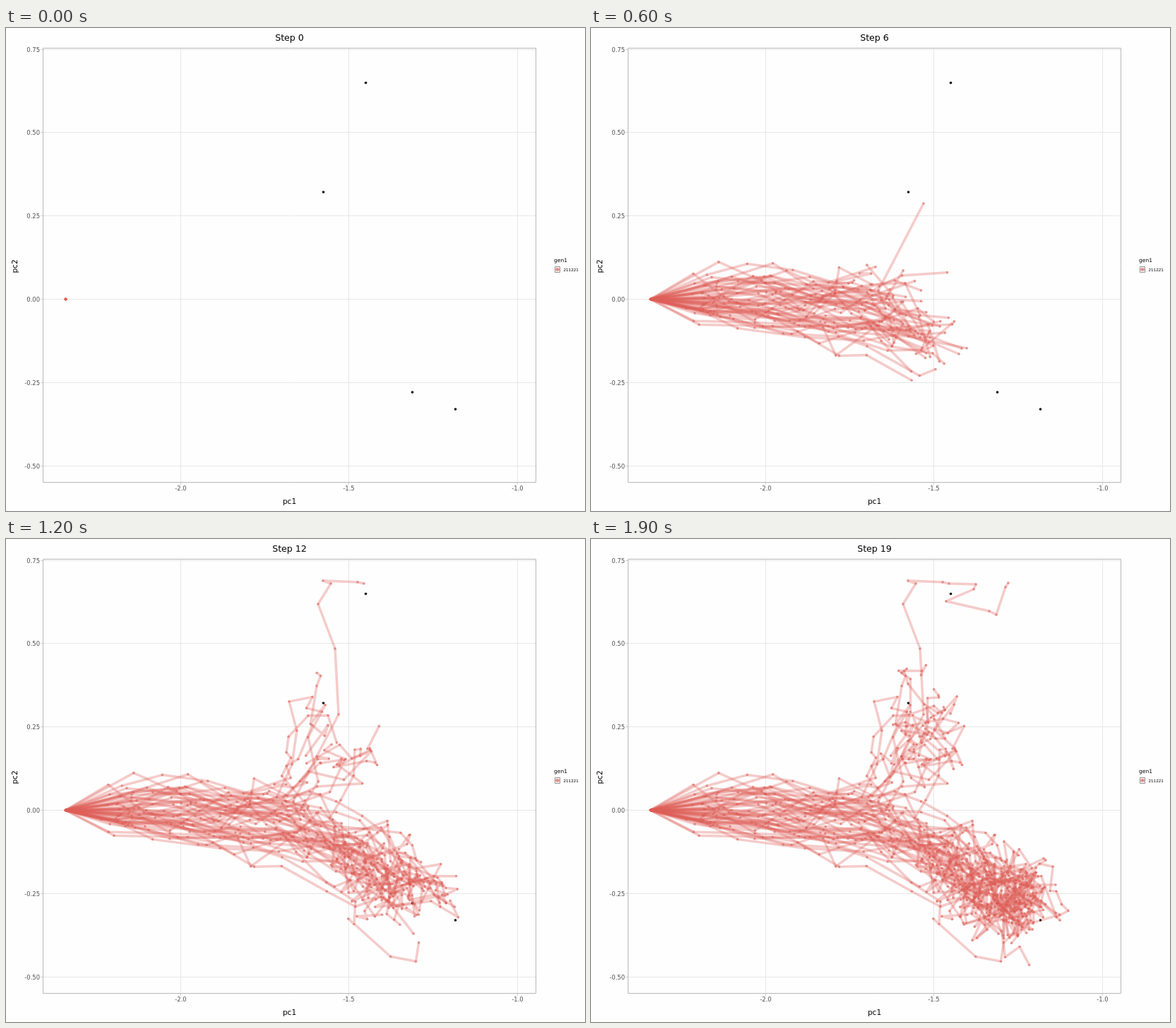
Recreate the animation shown at these times as an HTML page with a canvas. Size 820 by 683 pixels, loop 2000 ms.

```html
<!DOCTYPE html>
<html lang="en">
<head>
<meta charset="utf-8">
<title>Trait walks</title>
<style>
  html, body { margin: 0; width: 100%; height: 100%; overflow: hidden; background: #fefefe; }
  canvas { display: block; }
</style>
</head>
<body>
<canvas id="stage" width="820" height="683"></canvas>
<script>
const ctx = document.getElementById('stage').getContext('2d');
const STEP_MS = 100, STEPS = 20, WALKERS = 50, UPPER = 11, STRIDE = 86;
const RED = '219,95,87';
const START = [84.5, 383.5];
const OPTIMA = [[509.5, 77.5], [449.5, 232], [575.5, 515], [636.5, 539]];
// The one walker that climbs to the top optimum: its last positions
const CLIMB = [[471, 248], [466, 155], [442, 92], [460, 63], [449, 59], [498, 61], [507, 63],
  [545, 64], [542, 71], [503, 88], [564, 102], [574, 107], [587, 68], [591, 62]];
const toX = v => 247.5 + (v + 2) * 476.6;
const toY = v => 383.5 - v * 471.2;

function seededRandom(seed) {
  return () => {
    seed = (seed + 0x6D2B79F5) | 0;
    let t = Math.imul(seed ^ (seed >>> 15), 1 | seed);
    t = (t + Math.imul(t ^ (t >>> 7), 61 | t)) ^ t;
    return ((t ^ (t >>> 14)) >>> 0) / 4294967296;
  };
}
const random = seededRandom(211221);
const spread = () => random() * 2 - 1;
const bell = () => spread() + spread() + spread();

// Walkers run level at a steady stride, then slow down and bend towards their goal.
function makeWalk(index) {
  const upper = index < UPPER, lean = spread();
  const [goalX, goalY] = upper ? [468 + 22 * lean, 268 + 20 * lean] : [594 + 46 * lean, 521 + 24 * lean];
  const bend = upper ? 8 : 4;
  const walk = [START];
  let dx = 0, dy = 38 * spread();
  for (let step = 1; step < STEPS; step++) {
    const progress = Math.tanh(step * STRIDE / (goalX - START[0]));
    dx = dx * 0.72 + bell() * 19;
    dy = dy * 0.8 + bell() * 19;
    walk.push([
      START[0] + (goalX - START[0]) * progress + dx,
      START[1] + (goalY - START[1]) * progress ** bend + dy
    ]);
  }
  return walk;
}
const walks = Array.from({ length: WALKERS }, (_, i) => makeWalk(i));
walks[0].splice(STEPS - CLIMB.length, CLIMB.length, ...CLIMB);

function line(x0, y0, x1, y1, color, width = 1) {
  ctx.strokeStyle = color;
  ctx.lineWidth = width;
  ctx.beginPath();
  ctx.moveTo(x0, y0);
  ctx.lineTo(x1, y1);
  ctx.stroke();
}

function dot(x, y, r, color) {
  ctx.fillStyle = color;
  ctx.beginPath();
  ctx.arc(x, y, r, 0, 2 * Math.PI);
  ctx.fill();
}

function label(text, x, y, size, align = 'center', color = '#000') {
  ctx.font = `${size}px "DejaVu Sans", sans-serif`;
  ctx.textAlign = align;
  ctx.fillStyle = color;
  ctx.fillText(text, x, y);
}

function drawAxes() {
  for (let v = -2; v <= -1; v += 0.5) {
    const x = Math.floor(toX(v)) + 0.5;
    line(x, 29, x, 642, '#e7e7e7');
    line(x, 643, x, 646, '#d0d0d0');
    label(v.toFixed(1), x, 654, 8.4, 'center', '#4d4d4d');
  }
  for (let v = -0.5; v <= 0.75; v += 0.25) {
    const y = Math.floor(toY(v)) + 0.5;
    line(53, y, 750, y, '#e7e7e7');
    line(49, y, 52, y, '#d0d0d0');
    label(v.toFixed(2), 48, y + 3, 8.4, 'right', '#4d4d4d');
  }
  label('pc1', 401.5, 672.5, 10.5);
  ctx.save();
  ctx.translate(16, 337);
  ctx.rotate(-Math.PI / 2);
  label('pc2', 0, 0, 10.5);
  ctx.restore();
}

function drawLegend() {
  label('gen1', 776, 331, 7.5, 'left');
  ctx.strokeStyle = '#777';
  ctx.lineWidth = 0.8;
  ctx.strokeRect(777.5, 337.5, 7, 8);
  line(778, 341.5, 784, 341.5, `rgba(${RED},.35)`, 3.5);
  dot(781, 341.5, 2.4, `rgba(${RED},.6)`);
  label('211221', 789.5, 343.5, 5.6, 'left');
}

function drawWalks(step) {
  const trails = walks.map(walk => walk.slice(0, step + 1));
  ctx.strokeStyle = `rgba(${RED},.32)`;
  ctx.lineWidth = 3.5;
  ctx.lineJoin = 'round';
  for (const trail of trails) {
    ctx.beginPath();
    trail.forEach(p => ctx.lineTo(...p));
    ctx.stroke();
  }
  for (const [x, y] of trails.flat()) dot(x, y, 1.8, `rgba(${RED},.6)`);
}

function draw() {
  const step = Math.floor(performance.now() / STEP_MS) % STEPS;
  ctx.fillStyle = '#fefefe';
  ctx.fillRect(0, 0, 820, 683);
  drawAxes();
  for (const [x, y] of OPTIMA) dot(x, y, 1.8, '#000');
  drawWalks(step);
  ctx.strokeStyle = '#b8b8b8';
  ctx.lineWidth = 1;
  ctx.strokeRect(52.5, 28.5, 698, 614);
  label(`Step ${step}`, 401.5, 18, 12.6);
  drawLegend();
  requestAnimationFrame(draw);
}
draw();
</script>
</body>
</html>
```
